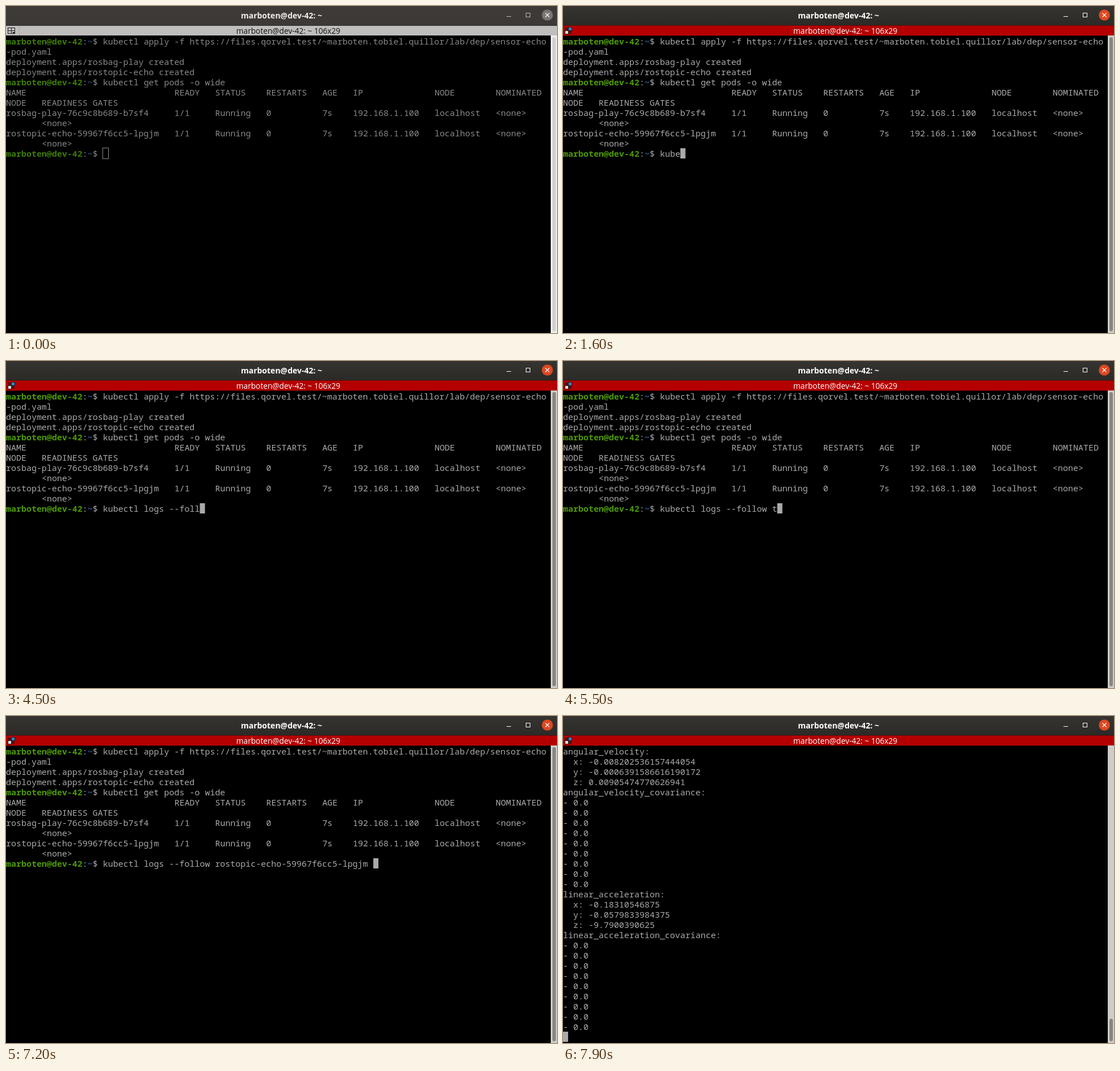
An HTML page with a canvas that plays this animation: 971x577 px, repeating every 8000 ms.

```html
<!DOCTYPE html>
<html lang="en">
<head>
<meta charset="utf-8">
<title>Terminal</title>
<style>
html, body { margin: 0; width: 100%; height: 100%; overflow: hidden; background: #000; }
canvas { display: block; }
</style>
</head>
<body>
<canvas id="stage" width="971" height="577"></canvas>
<script>
const ctx = document.getElementById('stage').getContext('2d');
const W = 971, H = 577, LOOP = 8000;
const CELL = 8.99, LINE = 18, TOP = 53;
const MONO = `${CELL / 0.6}px "Noto Sans Mono", "DejaVu Sans Mono", monospace`;
const SANS = '"Open Sans", "Noto Sans", sans-serif';

const user = 'marboten@dev-42';
const echoPod = 'rostopic-echo-59967f6cc5-lpgjm';
const command = `kubectl logs --follow ${echoPod} `;

const columns = [0, 33, 41, 51, 62, 68, 84, 96];
const podRow = name => [name, '1/1', 'Running', '0', '7s', '192.168.1.100', 'localhost', '<none>'];

// [time, typed characters, cursor hidden]
const keys = [
  [0, 0], [900, 0, true], [1100, 0], [1200, 1], [1300, 2], [1400, 3], [1600, 4],
  [2000, 6], [2100, 8], [2700, 8, true], [2800, 9], [3000, 10], [3100, 11],
  [3300, 12], [3400, 13], [3700, 14], [3800, 15], [4000, 16], [4200, 17], [4300, 18],
  [4500, 19], [4600, 20], [4700, 21], [4800, 22], [5500, 23], [5800, 22], [5900, 23],
  [6000, 24], [6200, 25], [6700, 25, true], [7000, 26], [7200, command.length]
];

const zeros = Array(9).fill('- 0.0');
const output = [
  'angular_velocity:',
  '  x: -0.008202536157444054',
  '  y: -0.0006391586616190172',
  '  z: 0.00905474770626941',
  'angular_velocity_covariance:', ...zeros,
  'linear_acceleration:',
  '  x: -0.18310546875',
  '  y: -0.0579833984375',
  '  z: -9.7900390625',
  'linear_acceleration_covariance:', ...zeros
];

const mix = (a, b, k) => `rgb(${a.map((v, i) => Math.round(v + (b[i] - v) * k))})`;

function rect(x, y, w, h, color) {
  ctx.fillStyle = color;
  ctx.fillRect(x, y, w, h);
}

function disc(x, y, r, color) {
  ctx.fillStyle = color;
  ctx.beginPath();
  ctx.arc(x, y, r, 0, Math.PI * 2);
  ctx.fill();
}

function pill(x, y, w, h, color) {
  ctx.fillStyle = color;
  ctx.beginPath();
  ctx.roundRect(x, y, w, h, w / 2);
  ctx.fill();
}

function label(text, x, y, font, color) {
  ctx.font = font;
  ctx.fillStyle = color;
  ctx.textAlign = 'center';
  ctx.fillText(text, x, y);
}

function put(text, col, row, color, bold) {
  ctx.font = (bold ? 'bold ' : '') + MONO;
  ctx.fillStyle = color;
  ctx.textAlign = 'left';
  ctx.fillText(text, col * CELL, TOP + row * LINE + 15);
}

function prompt(row, text, colors) {
  put(user, 0, row, colors.green, true);
  put(':', 15, row, colors.text);
  put('~', 16, row, colors.blue, true);
  put('$ ' + text, 17, row, colors.text);
}

function cursor(col, row, focused, color) {
  const x = col * CELL, y = TOP + row * LINE;
  if (focused) return rect(x, y, CELL, LINE, color);
  ctx.strokeStyle = color;
  ctx.lineWidth = 1;
  ctx.strokeRect(Math.round(x) - 0.5, y - 0.5, 10, LINE + 1);
}

function header(k) {
  const shade = ctx.createLinearGradient(0, 0, 0, 34);
  shade.addColorStop(0, mix([62, 58, 55], [54, 52, 49], k));
  shade.addColorStop(1, mix([60, 57, 54], [43, 42, 39], k));
  rect(0, 0, W, 35, shade);
  rect(0, 34, W, 1, mix([48, 45, 43], [30, 27, 25], k));
  label(user + ': ~', 485.5, 22, `bold 14px ${SANS}`, mix([240, 239, 237], [255, 255, 255], k));

  const ink = mix([190, 187, 183], [255, 255, 255], k);
  rect(882, 18, 8, 1, ink);
  ctx.strokeStyle = ink;
  ctx.lineWidth = 1;
  ctx.strokeRect(916.5, 12.5, 7, 7);
  disc(954, 16, 9.8, mix([119, 116, 113], [221, 72, 34], k));
  ctx.strokeStyle = '#fff';
  ctx.lineWidth = 1.2;
  ctx.beginPath();
  ctx.moveTo(950.5, 12.5); ctx.lineTo(957.5, 19.5);
  ctx.moveTo(957.5, 12.5); ctx.lineTo(950.5, 19.5);
  ctx.stroke();
}

function bulb() {
  disc(962, 41.5, 5.2, '#eee');
  disc(962, 41.5, 3.2, '#99918f');
  disc(963, 40.5, 1.6, '#fff');
  rect(960, 46, 4, 4, '#ddd');
  rect(960, 47, 4, 1, '#555');
}

function paneBar(focused, bell) {
  rect(0, 35, W, 17, focused ? '#b40000' : '#c0bebc');
  if (focused) {
    rect(0, 34, W, 1, '#700808');
    rect(0, 52, W, 1, '#3c0000');
    rect(3, 38, 6, 5, '#5c0d0d');
    rect(9, 37, 7, 7, '#201a20');
    rect(10, 38, 5, 5, '#2f86c6');
    rect(3, 43, 7, 7, '#201a20');
    rect(4, 44, 5, 5, '#ddd');
    rect(10, 44, 5, 5, '#5c0d0d');
  } else {
    ctx.strokeStyle = '#222';
    ctx.lineWidth = 1;
    ctx.strokeRect(3.5, 38.5, 12, 10);
    rect(9, 38, 1, 11, '#222');
    rect(3, 43, 13, 1, '#222');
    rect(12, 46, 4, 3, '#222');
    rect(23, 35, 1, 17, '#a9a6a3');
  }
  label(user + ': ~ 106x29', bell ? 487.5 : 497.5, 49, `13.7px ${SANS}`, focused ? '#fff' : '#111');
  if (bell) bulb();
}

function scrollbar(k, y, h) {
  rect(960, 52, 11, H - 52, mix([240, 239, 238], [207, 205, 203], k));
  pill(963, y, 6, h, mix([210, 208, 206], [136, 134, 131], k));
}

function session(t, focused, colors) {
  prompt(0, 'kubectl apply -f https://files.qorvel.test/~marboten.tobiel.quillor/lab/dep/sensor-echo', colors);
  put('-pod.yaml', 0, 1, colors.text);
  put('deployment.apps/rosbag-play created', 0, 2, colors.text);
  put('deployment.apps/rostopic-echo created', 0, 3, colors.text);
  prompt(4, 'kubectl get pods -o wide', colors);

  const table = (row, cells) => cells.forEach((c, i) => put(c, columns[i], row, colors.text));
  table(5, ['NAME', 'READY', 'STATUS', 'RESTARTS', 'AGE', 'IP', 'NODE', 'NOMINATED']);
  put('NODE   READINESS GATES', 0, 6, colors.text);
  table(7, podRow('rosbag-play-76c9c8b689-b7sf4'));
  put('<none>', 7, 8, colors.text);
  table(9, podRow(echoPod));
  put('<none>', 7, 10, colors.text);

  const [, count, hidden] = keys.filter(key => key[0] <= t).pop();
  const typo = t >= 5500 && t < 5800;
  prompt(11, typo ? command.slice(0, count - 1) + 't' : command.slice(0, count), colors);
  if (t >= 7800) cursor(0, 12, true, colors.text);
  else if (!hidden) cursor(19 + count, 11, focused, colors.text);
}

function draw(t) {
  const focused = t >= 200;
  const k = Math.min(1, Math.floor(t / 100) / 5);
  const colors = focused
    ? { text: '#aaaaaa', green: '#4e9a06', blue: '#3465a4' }
    : { text: '#888888', green: '#3e7b05', blue: '#2a5183' };
  const logging = t >= 7900;

  rect(0, 0, W, H, '#000');
  header(k);
  paneBar(focused, t >= 6200 && t < 7200);
  if (logging) {
    output.forEach((line, row) => put(line, 0, row, colors.text));
    cursor(0, output.length, true, colors.text);
    scrollbar(k, 534, 40);
  } else {
    session(t, focused, colors);
    scrollbar(k, 55, 519);
  }
}

const start = performance.now();
function tick() {
  draw((performance.now() - start) % LOOP);
  requestAnimationFrame(tick);
}
tick();
</script>
</body>
</html>
```
